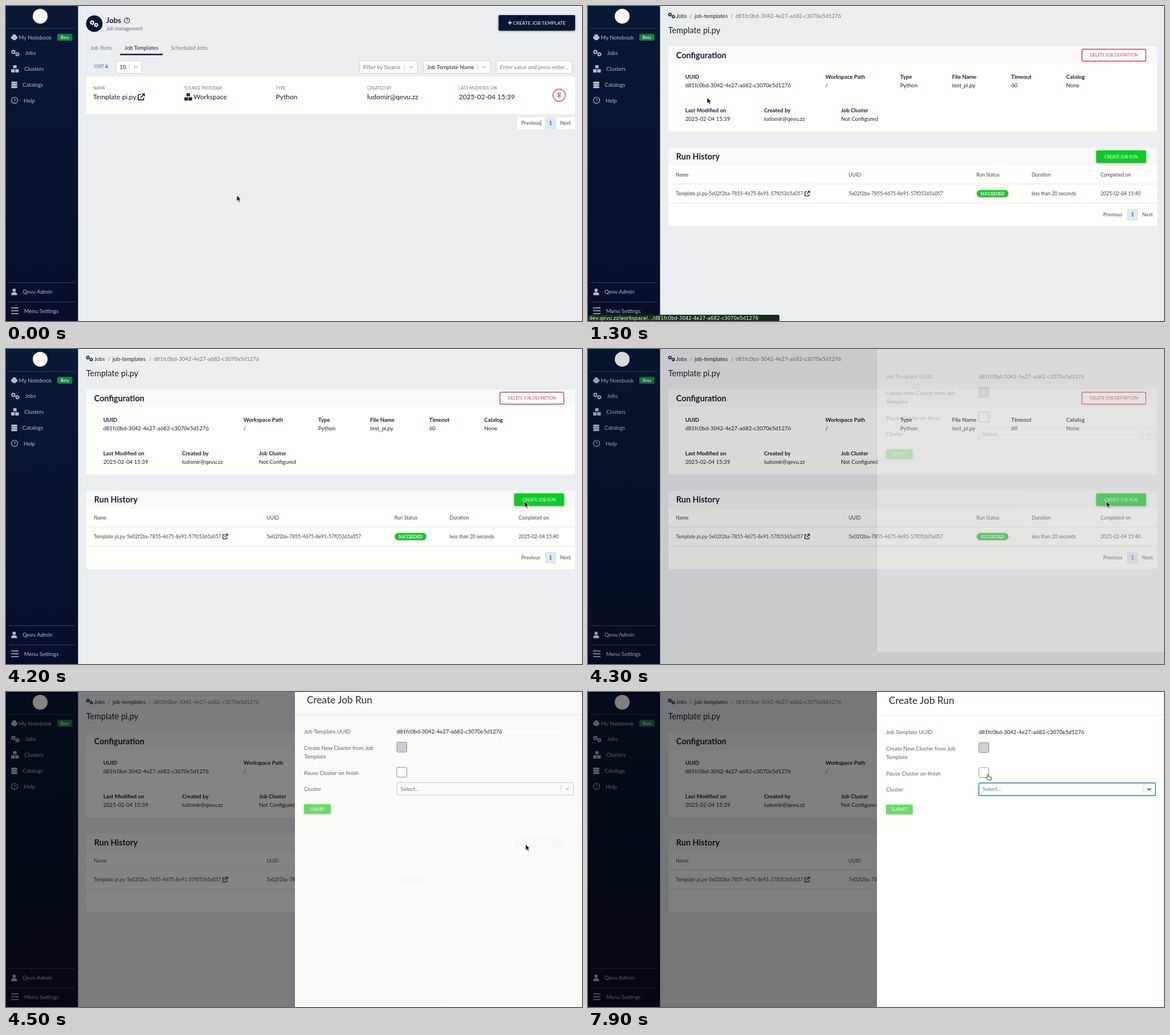
An HTML page for the animation above (8000 ms loop, 1011 by 554 pixels).

```html
<!DOCTYPE html>
<html lang="en">
<head>
<meta charset="utf-8">
<title>Create job run</title>
<style>
  html, body { margin: 0; width: 100%; height: 100%; overflow: hidden; background: #ebeef1; }
  svg { display: block; width: 100%; height: 100%; font-family: Lato, sans-serif; }
  .shadow { filter: drop-shadow(0 1.5px 2px rgba(0, 0, 0, .3)); }
  .soft { filter: drop-shadow(0 1px 1.5px rgba(0, 0, 0, .2)); }
</style>
</head>
<body>
<svg id="stage" viewBox="0 0 1011 554"></svg>
<script>
const INK = '#17202f', MUTE = '#6f747b', IVORY = '#fffffb', LINE = '#cccfd1', SIDE = '#b6bdca', RED = '#c9405c';
const UUID = 'd81fc0bd-3042-4e27-a682-c3070e5d1276';
const RUN = '5e02f2ba-7855-4675-8e91-57f05365a057';
const MAIL = 'ludomir@qevu.zz', STAMP = '2025-02-04 15:39';

// Drawing helpers, each returning markup
const text = (x, y, s, size = 9.6, fill = INK, weight = 400, anchor = 'start') =>
  `<text x="${x}" y="${y}" font-size="${size}" fill="${fill}" font-weight="${weight}" text-anchor="${anchor}">${s}</text>`;
const rect = (x, y, w, h, fill, r = 0, more = '') =>
  `<rect x="${x}" y="${y}" width="${w}" height="${h}" rx="${r}" fill="${fill}" ${more}/>`;
const path = (d, stroke, width = 1, fill = 'none', more = '') =>
  `<path d="${d}" fill="${fill}" stroke="${stroke}" stroke-width="${width}" ${more}/>`;
const ring = (x, y, r, stroke, width = 1, more = '') =>
  `<circle cx="${x}" cy="${y}" r="${r}" fill="none" stroke="${stroke}" stroke-width="${width}" ${more}/>`;
const dot = (x, y, r, fill) => `<circle cx="${x}" cy="${y}" r="${r}" fill="${fill}"/>`;
const at = (x, y, k, body) => `<g transform="translate(${x} ${y}) scale(${k})">${body}</g>`;
const group = (id, body) => `<g id="${id}">${body}</g>`;
const box = (x, y, w, h, stroke = LINE) => rect(x, y, w, h, IVORY, 2, `stroke="${stroke}"`);

// Icons
const gear = (x, y, r, c) => ring(x, y, r * .6, c, r * .45) +
  ring(x, y, r * .88, c, r * .3, 'pathLength="12" stroke-dasharray="1 1"');
const gears = (x, y, k, c) => at(x, y, k, gear(4.4, 4.2, 4, c) + gear(11.4, 8.3, 3.8, c));
const boxes = (x, y, c) => at(x, y, 1,
  rect(3.6, 0, 6, 5.5, c, .8) + rect(0, 7, 6.2, 6, c, .8) + rect(7.2, 7, 6.2, 6, c, .8) +
  path('M6.6 0v2.2M3 7v2.2M10.4 7v2.2', '#8d96a5', 1));
const external = (x, y, k, c) => at(x, y, k,
  path('M5 2H1.5Q.8 2 .8 2.7V10Q.8 10.7 1.5 10.7H8.8Q9.5 10.7 9.5 10V7M6.5.8H10.8V5M10.6 1 4.6 7', c, 1.5));
const chevron = (x, y, c) => path(`M${x - 3} ${y - 1.5}l3 3 3-3`, c, 1.4, 'none', 'class="chev"');
const help = (x, y, r, c, size) => ring(x, y, r, c, 1.2) + text(x, y + size * .36, '?', size, c, 700, 'middle');
const select = (x, y, w, h, label, color) => box(x, y, w, h) + text(x + 6.5, y + h / 2 + 3.3, label, 9.6, color) +
  path(`M${x + w - 22} ${y + 5}v${h - 10}`, LINE) + chevron(x + w - 11, y + h / 2, '#b9bcbf');

const sidebar = rect(0, 0, 126.5, 554, 'url(#navy)') +
  dot(60, 18, 13, '#fff') +
  path('M4 39.5H121M4 486.5H121M4 520.5H121', 'rgba(255,255,255,.2)') +
  rect(11.5, 50, 6, 4, SIDE, .8) + rect(9, 53, 11, 5, SIDE, 1.5) + rect(11.5, 56.5, 6, 3.5, SIDE, .8) +
  text(22.3, 58.5, 'My Notebook', 9.6, SIDE) +
  rect(90, 49, 26.5, 12, '#10823f', 2.5) + text(103.2, 57.5, 'Beta', 7.2, '#dfeee5', 700, 'middle') +
  gears(8.5, 76.5, 1, SIDE) + text(33.5, 86.3, 'Jobs', 9.6, SIDE) +
  boxes(9, 104, SIDE) + text(32, 114.3, 'Clusters', 9.6, SIDE) +
  [133, 137, 141].map(y => rect(9, y, 11, 3.4, SIDE, 1.6)).join('') + text(29, 142, 'Catalogs', 9.6, SIDE) +
  help(15, 166, 5.5, SIDE, 8) + text(31, 169.7, 'Help', 9.6, SIDE) +
  dot(14.3, 499.8, 2.9, SIDE) + path('M9 508.5q0-5 4-5h2.6q4 0 4 5z', 'none', 0, SIDE) +
  text(29, 506.3, 'Qevu Admin', 9.6, SIDE) +
  path('M9 531H22M9 536H22M9 541H22', SIDE, 1.6) + text(31.8, 539.5, 'Menu Settings', 9.6, SIDE);

const columns = [[153, 'NAME', ''], [313, 'SOURCE PROVIDER', ''], [473.5, 'TYPE', 'Python'],
  [634, 'CREATED BY', MAIL], [794.7, 'LAST MODIFIED ON', STAMP]];
const listPage =
  dot(155, 31, 14.5, '#05132e') + gears(146.8, 25, 1, '#fff') +
  text(175.7, 29.8, 'Jobs', 13.2, INK, 700) + help(212.3, 25.5, 4.5, INK, 7) +
  text(175.7, 42.8, 'Job management', 8.6, MUTE) +
  rect(864.5, 16, 134.5, 27.5, '#061532', 2, 'class="shadow"') +
  path('M881 29.5h7M884.5 26v7', '#fff', 1.3) + text(890, 33, 'CREATE JOB TEMPLATE', 8.45, '#fff') +
  text(148, 76.7, 'Job Runs', 9.6, MUTE) + text(208, 76.7, 'Job Templates') +
  text(289.3, 76.7, 'Scheduled Jobs', 9.6, MUTE) + rect(200.3, 84, 74.7, 2.5, '#0a1a38') +
  text(154, 108.6, 'SORT', 7.2, '#2a78b5') + path('M176.7 102.5v6M174 106l2.7 2.7 2.7-2.7', '#2a78b5', 1.2) +
  select(193, 96.5, 45.5, 22, '10', INK) +
  select(620.5, 96.5, 101.5, 22, 'Filter by Source', MUTE) +
  select(732.5, 96.5, 117.5, 22, 'Job Template Name', INK) +
  box(860.5, 96.5, 133.5, 22) + text(866.8, 110.8, 'Enter value and press enter...', 9.6, '#7a7f85') +
  rect(141, 124, 858, 66, IVORY, 3) +
  columns.map(([x, label, value]) => text(x, 146.8, label, 7.2, MUTE) + text(x, 164, value, 12)).join('') +
  group('link', text(152.7, 164, 'Template pi.py', 12, 'currentColor') + external(231.3, 153.6, 1.08, 'currentColor')) +
  boxes(313.2, 153.3, INK) + text(329, 164, 'Workspace', 12) +
  ring(970.8, 157, 10.8, RED, 1.3) + rect(968.2, 154.8, 5.2, 6, '#dc8494', .8) + path('M967.3 153.8h7M969.8 153h2', RED, 1) +
  rect(897, 196, 48.5, 20.5, IVORY, 2) + rect(946, 196, 19.5, 20.5, '#dfe9f1') + rect(966, 196, 33, 20.5, IVORY, 2) +
  text(904.3, 209.3, 'Previous', 8.7, MUTE, 700) + text(955.8, 209.3, '1', 8.7, '#2a4f70', 700, 'middle') +
  text(972.5, 209.3, 'Next', 8.7, MUTE, 700) + group('pageCaret', rect(938.5, 201, .8, 10, '#333'));

const facts = [
  [170.7, 128.2, 'UUID', UUID], [416.7, 128.2, 'Workspace Path', '/'], [548, 128.2, 'Type', 'Python'],
  [639, 128.2, 'File Name', 'test_pi.py'], [742.7, 128.2, 'Timeout', '60'], [839.3, 128.2, 'Catalog', 'None'],
  [170.7, 187.2, 'Last Modified on', STAMP], [309, 187.2, 'Created by', MAIL], [444, 187.2, 'Job Cluster', 'Not Configured']];
const heads = [[154.3, 'Name'], [457.5, 'UUID'], [681.8, 'Run Status'], [778.7, 'Duration'], [899.5, 'Completed on']];
const card = (y, h, title) => rect(141, y, 858, h, IVORY, 4) + rect(141, y, 858, 31, '#f8f9f8', 4) +
  text(154.8, y + 20.6, title, 14.4, INK, 700);
const detailPage =
  gears(140, 11.5, .85, INK) + text(154.8, 20.5, 'Jobs') + text(178.5, 20.5, '/', 9.6, MUTE) +
  text(187, 20.5, 'job-templates') + text(250.5, 20.5, '/', 9.6, MUTE) + text(259, 20.5, UUID, 9.6, MUTE) +
  text(140.8, 47.6, 'Template pi.py', 14.4) +
  card(71, 149.5, 'Configuration') +
  rect(867, 76, 112, 21, IVORY, 2, `stroke="${RED}" stroke-width="1.4"`) +
  text(923, 89.2, 'DELETE JOB DEFINITION', 7.3, RED, 400, 'middle') +
  facts.map(([x, y, label, value]) => text(x, y, label, 9.6, INK, 700) + text(x, y + 14.4, value)).join('') +
  card(249.5, 137.5, 'Run History') +
  rect(892, 254, 87.5, 22, '#0dcb27', 2, 'class="shadow"') + text(935.8, 268.1, 'CREATE JOB RUN', 7.2, '#eaffec', 400, 'middle') +
  heads.map(([x, label]) => text(x, 300, label, 8.6, '#3c424b')).join('') +
  path('M141 313H999M141 346.7H999', '#e2e5e6') +
  group('runRow',
    text(154.3, 333.2, 'Template pi.py-' + RUN, 8.6, '#3c424b') + external(380, 325, .83, INK) +
    text(457.5, 333.2, RUN, 8.6, '#3c424b') +
    rect(682, 323.5, 56, 13, '#20c432', 6.5) + text(710, 332.6, 'SUCCEEDED', 7.2, '#fff', 700, 'middle') +
    text(778.7, 333.2, 'less than 20 seconds', 8.6, '#3c424b') + text(899.5, 333.2, '2025-02-04 15:40', 8.6, '#3c424b')) +
  rect(946, 357, 19.5, 20.5, '#dfe9f1', 2) + text(904.3, 370.2, 'Previous', 8.7, MUTE, 700) +
  text(955.8, 370.2, '1', 8.7, '#2a4f70', 700, 'middle') + text(972.5, 370.2, 'Next', 8.7, MUTE, 700);

const statusBar = path('M0 543H333q3 0 3 3V554H0z', 'none', 0, '#132f17') +
  `<text x="2.5" y="552" font-size="8.6" fill="#fff" font-family="DejaVu Sans, sans-serif">dev.qevu.zz/workspace/.../${UUID}</text>`;

const drawerBody = rect(506, 0, 1, 555, 'rgba(0,0,0,.2)') + rect(507, 0, 504, 555, IVORY) +
  text(528, 20.8, 'Create Job Run', 17.28, '#262d38') + path('M507 40.5H1011', '#e6e8e8') +
  text(523.2, 73.5, 'Job Template UUID', 9.6, '#5d636b') + text(685.7, 73.5, UUID) +
  text(523.2, 102.5, 'Create New Cluster from Job', 9.6, '#5d636b') + text(523.2, 117.7, 'Template', 9.6, '#5d636b') +
  rect(686, 89, 17.5, 17.5, '#cdd2d8', 2, 'stroke="#8b9096"') +
  text(523.2, 146.5, 'Pause Cluster on finish', 9.6, '#5d636b') + rect(686, 133, 17.5, 17.5, IVORY, 2, 'stroke="#8b9096"') +
  text(523.2, 175, 'Cluster', 9.6, '#5d636b') +
  rect(523, 198, 47, 17, '#6bdc69', 2, 'class="soft"') + text(546.5, 209.2, 'SUBMIT', 7.2, '#f2fff2', 400, 'middle') +
  select(686, 160, 310, 22, 'Select...', MUTE) +
  group('focus', rect(686, 160, 310, 22.3, 'none', 2, 'stroke="#2684c4" stroke-width="1.4"')) +
  group('caret', rect(692.2, 165, .9, 12, '#222')) +
  group('menu', rect(686, 187, 310.3, 28.8, IVORY, 2, 'class="shadow"') +
    text(841, 205.3, 'No Clusters found', 9.6, '#999c9f', 400, 'middle'));

const arrow = path('M0 0V10.6L2.5 8.3 4.2 12.2 6 11.4 4.3 7.6H7.6Z', '#fff', .7, '#15171a');
const hand = path('M-1.3 1.2q0-1.4 1.2-1.4t1.2 1.4V4l4 .7q1.4.3 1.2 1.8L5.6 10H.6L-2.8 6.2q-.3-1.2 1.5-.6z', '#222', .9, '#fff');

const stage = document.getElementById('stage');
stage.innerHTML = `<defs><linearGradient id="navy" x2="0" y2="1"><stop stop-color="#081835"/><stop offset="1" stop-color="#070e2b"/></linearGradient></defs>` +
  rect(0, 0, 1011, 554, '#ebeef1') + group('list', listPage) + group('detail', detailPage) + sidebar +
  group('status', statusBar) + group('dim', rect(0, 0, 1011, 554, '#000')) +
  group('drawer', drawerBody) + group('pointer', group('arrow', arrow) + group('hand', hand));

const el = id => document.getElementById(id);
const show = (id, on) => { el(id).style.display = on ? '' : 'none'; };
const clamp = v => Math.min(1, Math.max(0, v));

// Pointer stops: time, x, y
const stops = [[0, 405, 333], [400, 235, 177], [500, 235, 177], [900, 209, 161], [1500, 209, 161],
  [2000, 236, 282], [2200, 236, 282], [2300, 236, 283], [2400, 236, 283], [2900, 266, 350], [3000, 266, 350],
  [3900, 910, 268], [4300, 910, 268], [4400, 912, 268], [4500, 912, 268], [4900, 764, 221], [5000, 764, 203],
  [5100, 764, 203], [5300, 763, 180], [7500, 763, 180], [7900, 702, 145], [8000, 702, 145]];

function pointerAt(t) {
  const i = stops.findIndex(s => s[0] > t), [t0, x0, y0] = stops[i - 1], [t1, x1, y1] = stops[i];
  const p = (t - t0) / (t1 - t0), e = p * p * (3 - 2 * p);
  return [x0 + (x1 - x0) * e, y0 + (y1 - y0) * e];
}

function draw(t) {
  show('list', t < 1200);
  show('detail', t >= 1200);
  show('runRow', t >= 1300);
  show('pageCaret', t < 200 || t >= 700);
  show('status', t >= 700 && t < 1800);
  el('link').style.color = t >= 700 ? '#2a78b5' : INK;

  const fade = clamp((t - 4210) / 300), slide = clamp((t - 4210) / 360);
  el('dim').style.opacity = .5 * fade;
  el('drawer').style.opacity = fade;
  el('drawer').setAttribute('transform', `translate(0 ${-46 * (1 - slide) ** 2.6})`);

  show('focus', t >= 5300);
  show('menu', t >= 5300 && t < 7100);
  show('caret', t >= 5300 && t < 6000 || t >= 6500 && t < 7600);
  el('drawer').querySelector('.chev').style.stroke = t < 5300 ? '#b9bcbf' : t < 5600 ? '#7d8185' : '#33383d';

  show('arrow', t < 7900);
  show('hand', t >= 7900);
  el('pointer').setAttribute('transform', `translate(${pointerAt(t)})`);
}

// The picture advances in tenths of a second
const start = performance.now();
function tick() {
  draw(Math.floor((performance.now() - start) % 8000 / 100) * 100);
  requestAnimationFrame(tick);
}
tick();
</script>
</body>
</html>
```
